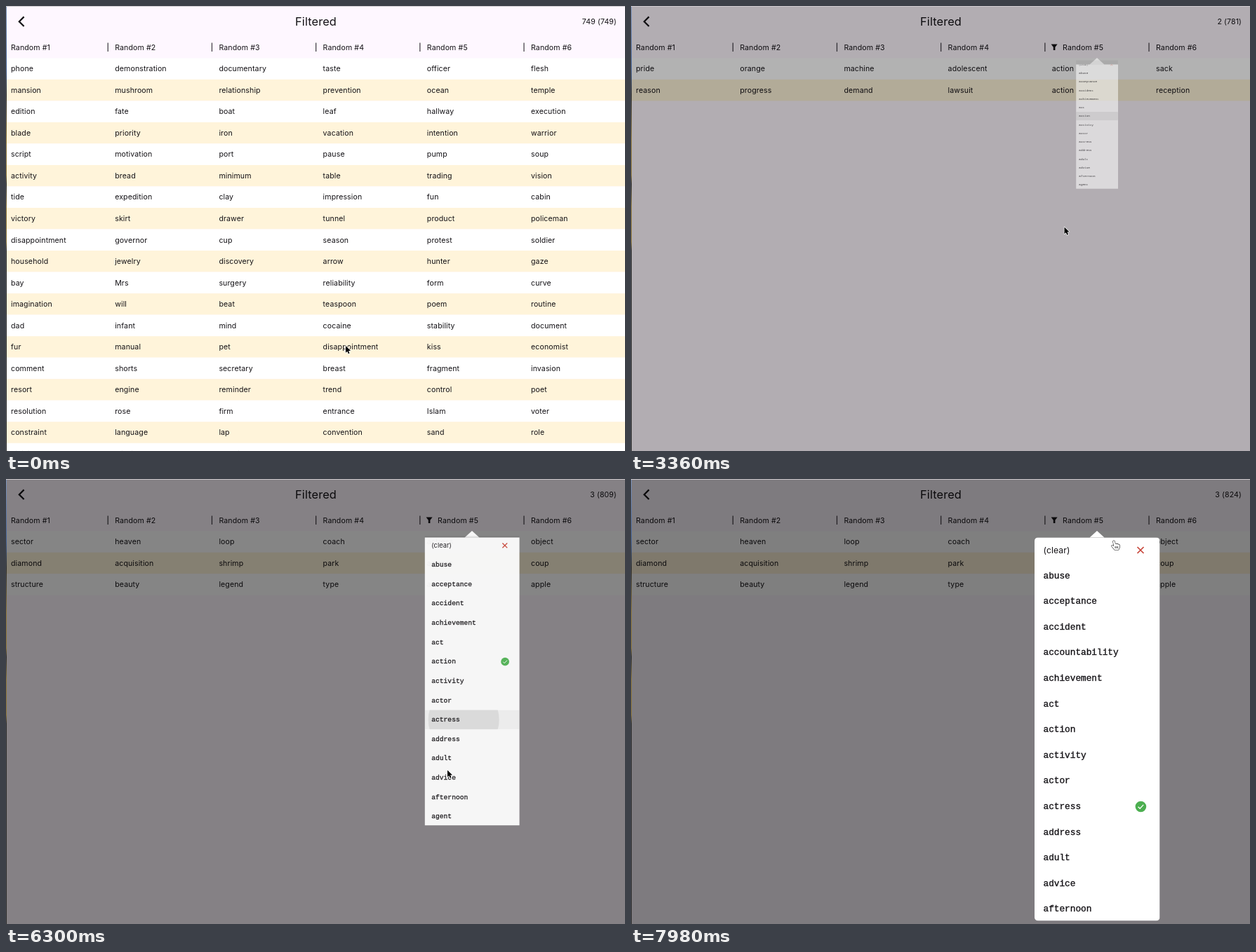
An HTML page with a canvas for the animation above (8000 ms loop, 882x635 px).

```html
<!DOCTYPE html>
<html lang="en">
<head>
<meta charset="utf-8">
<title>Filtered</title>
<style>
  html, body { margin: 0; width: 100%; height: 100%; overflow: hidden; background: #fef7ff; }
  canvas { display: block; width: 882px; height: 635px; }
</style>
</head>
<body>
<canvas id="stage"></canvas>
<script>
const W = 882, H = 635, LOOP = 8000, FADE = 200;
const SANS = 'Inter, sans-serif', MONO = '"Liberation Mono", monospace';
const INK = '#141216';
const canvas = document.getElementById('stage');
const ctx = canvas.getContext('2d');
const ratio = window.devicePixelRatio || 1;
canvas.width = W * ratio;
canvas.height = H * ratio;

const table = text => text.trim().split('\n').map(line => line.trim().split(' '));
const tables = {
  all: table(`
    phone demonstration documentary taste officer flesh
    mansion mushroom relationship prevention ocean temple
    edition fate boat leaf hallway execution
    blade priority iron vacation intention warrior
    script motivation port pause pump soup
    activity bread minimum table trading vision
    tide expedition clay impression fun cabin
    victory skirt drawer tunnel product policeman
    disappointment governor cup season protest soldier
    household jewelry discovery arrow hunter gaze
    bay Mrs surgery reliability form curve
    imagination will beat teaspoon poem routine
    dad infant mind cocaine stability document
    fur manual pet disappointment kiss economist
    comment shorts secretary breast fragment invasion
    resort engine reminder trend control poet
    resolution rose firm entrance Islam voter
    constraint language lap convention sand role
    division wildlife protein sauce theme college`),
  action: table(`
    pride orange machine adolescent action sack
    reason progress demand lawsuit action reception`),
  actress: table(`
    sector heaven loop coach actress object
    diamond acquisition shrimp park actress coup
    structure beauty legend type actress apple`)
};

const words = ('abuse acceptance accident achievement act action activity actor ' +
  'actress address adult advice afternoon agent').split(' ');
const longerWords = [...words.slice(0, 3), 'accountability', ...words.slice(3, -1)];

// press: header tapped, open/close: popup transitions, pick: item tapped
const popups = [
  { press: 1190, open: 1330, pick: 3110, close: 3228, items: words, choice: 'action' },
  { press: 4540, open: 4690, pick: 6130, close: 6252, items: words, checked: 'action', choice: 'actress' },
  { press: 7330, open: 7470, pick: 1e9, close: 1e9, items: longerWords, checked: 'actress' }
];

const pointerPath = [
  [0, 484, 485], [139, 484, 485], [140, 636, 72], [700, 627, 62], [1050, 627, 62],
  [1680, 626, 64], [2200, 626, 64], [2870, 613, 303], [3080, 616, 314], [3300, 617.5, 315.5],
  [4060, 617.5, 315.5], [4480, 640, 61], [5000, 640, 61], [5600, 632, 412], [5810, 629, 415.5],
  [6310, 629, 415.5], [6720, 650, 32], [6880, 650, 32], [7140, 653, 52], [7700, 653, 52],
  [7980, 688, 88], [LOOP, 688, 88]
];

const COLUMN = 148.2, ROW = 30.53, TABLE_TOP = 74.3;
const header = { x: 594, y: 44, w: 140, h: 29.5 };
const popup = { x: 575, y: 83.4, w: 178.5, h: 547, row: 36.6, first: 101.3 };
const tip = { x: 664, y: 74.5 };

const arrowShape = new Path2D('M0 0V9.8L2.3 7.8L3.8 11.3L5.5 10.5L4.1 7.1L7.1 6.9Z');
const handShape = new Path2D('M-1.2 1Q0-1 1.2 1L2 4.5Q5 4 8 6L8.4 9L6.6 13H1L-3 8Q-3.4 6.3-1.8 6.6L0 8Z');

// Sliver of the desktop showing along the left border
const desktop = ctx.createLinearGradient(0, 0, 0, H);
[[0, '#7d93b8'], [0.14, '#3f5f94'], [0.2, '#2b2b2b'], [0.3, '#8a7336'], [0.38, '#8a7336'],
  [0.4, '#2b2b2b'], [0.45, '#8a7336'], [0.53, '#8a7336'], [0.55, '#2b2b2b']]
  .forEach(([stop, color]) => desktop.addColorStop(stop, color));

const clamp = v => Math.max(0, Math.min(1, v));
const easeOut = (p, power) => 1 - (1 - p) ** power;
const shade = alpha => `rgba(0,0,0,${alpha})`;
const inside = (p, r) => p.x >= r.x && p.x <= r.x + r.w && p.y >= r.y && p.y <= r.y + r.h;

function rect(x, y, w, h, color) {
  ctx.fillStyle = color;
  ctx.fillRect(x, y, w, h);
}

function circle(x, y, r, color) {
  ctx.fillStyle = color;
  ctx.beginPath();
  ctx.arc(x, y, r, 0, 2 * Math.PI);
  ctx.fill();
}

function line(points, width, color) {
  ctx.lineWidth = width;
  ctx.strokeStyle = color;
  ctx.beginPath();
  points.forEach(([x, y]) => ctx.lineTo(x, y));
  ctx.stroke();
}

function polygon(points, color) {
  ctx.fillStyle = color;
  ctx.beginPath();
  points.forEach(([x, y]) => ctx.lineTo(x, y));
  ctx.fill();
}

function label(text, x, y, size = 10.6, family = SANS, align = 'left') {
  ctx.font = `${size}px ${family}`;
  ctx.letterSpacing = family === SANS ? '0.1px' : '0px';
  ctx.textAlign = align;
  ctx.fillStyle = INK;
  ctx.fillText(text, x, y);
}

// Monospaced text, slightly heavier than regular
function monoLabel(text, x, y) {
  label(text, x, y, 12.75, MONO);
  ctx.lineWidth = 0.35;
  ctx.strokeStyle = INK;
  ctx.strokeText(text, x, y);
}

function clipped(r, draw) {
  ctx.save();
  ctx.beginPath();
  ctx.rect(r.x, r.y, r.w, r.h);
  ctx.clip();
  draw();
  ctx.restore();
}

function pointerAt(t) {
  const i = pointerPath.findIndex(key => key[0] > t);
  const [t0, x0, y0] = pointerPath[i - 1], [t1, x1, y1] = pointerPath[i];
  const u = (t - t0) / (t1 - t0), k = u * u * (3 - 2 * u);
  return { x: x0 + (x1 - x0) * k, y: y0 + (y1 - y0) * k };
}

const openness = (p, t) => Math.min(clamp((t - p.open) / FADE), clamp(1 - (t - p.close) / FADE));

function drawHeader(t, filter, hovered, current, p) {
  line([[25.6, 15.4], [18.8, 22.2], [25.6, 29]], 2.2, INK);
  label('Filtered', 441.5, 28, 16.4, SANS, 'center');
  const total = Math.floor(749.55 + t * 0.00945);
  const shown = filter === 'all' ? total : tables[filter].length;
  label(`${shown} (${total})`, 870, 25.8, 10.6, SANS, 'right');

  if (hovered) rect(header.x, header.y, header.w, header.h, shade(0.045));
  if (current && t < current.open + FADE) {
    const age = t - current.press, spot = pointerAt(current.press);
    clipped(header, () => {
      ctx.globalAlpha = 1 - p;
      rect(header.x, header.y, header.w, header.h, shade(0.045));
      circle(spot.x, 58, age * 0.25, shade(0.03));
    });
  }
  for (let i = 0; i < 6; i++) {
    const filtered = i === 4 && filter !== 'all';
    const x = 7 + COLUMN * i;
    if (i) rect(x - 10.6, 52.5, 1.3, 12.5, '#4a454d');
    label(`Random #${i + 1}`, x + (filtered ? 15.3 : 0), 62.5);
  }
  if (filter !== 'all') {
    polygon([[598.6, 54.6], [607.6, 54.6], [604.4, 58.8], [604.4, 63], [601.8, 63], [601.8, 58.8]], INK);
  }
}

function drawTable(rows) {
  rows.forEach((row, i) => {
    const y = TABLE_TOP + ROW * i;
    rect(0, y, W, ROW, i % 2 ? '#fff4da' : '#ffffff');
    row.forEach((word, c) => label(word, 7 + COLUMN * c, y + 19));
  });
}

function drawItems(current, t) {
  label('(clear)', 587.5, popup.first + 4.2, 12.2);
  line([[721.5, 97], [730.5, 106]], 1.7, '#c8463a');
  line([[721.5, 106], [730.5, 97]], 1.7, '#c8463a');
  current.items.forEach((word, i) => {
    const y = popup.first + popup.row * (i + 1);
    const box = { x: popup.x, y: y - popup.row / 2, w: popup.w, h: popup.row };
    if (word === current.choice && t >= current.pick) {
      const k = clamp((t - current.pick) / 230), x = pointerAt(current.pick).x;
      clipped(box, () => {
        rect(box.x, box.y, box.w, box.h, shade(0.045));
        circle(x + (tip.x - x) * k * k, y, 90 * k, shade(0.08));
      });
    }
    monoLabel(word, 587.5, y + 3.7);
    if (word === current.checked) {
      circle(726.4, y + 0.2, 7.8, '#4caf50');
      line([[722.6, y + 0.4], [725.2, y + 3], [730.2, y - 2.4]], 1.3, '#fff');
    }
  });
}

function drawPopup(current, p, t) {
  rect(0, 0, W, H, shade(0.5 * easeOut(p, 2.26)));
  ctx.save();
  ctx.globalAlpha = easeOut(p, 1.9);
  polygon([[tip.x, 74], [tip.x + 10.5, popup.y], [tip.x - 10.5, popup.y]], '#fff');
  const top = tip.y + (popup.y - tip.y) * p;
  if (p < 1) rect(tip.x - popup.w / 2 * p, top, popup.w * p, popup.y - top, shade(0.08));

  ctx.beginPath();
  ctx.roundRect(popup.x, popup.y, popup.w, popup.h, 5);
  ctx.clip();
  ctx.translate(tip.x, tip.y);
  ctx.scale(p, p);
  ctx.translate(-tip.x, -tip.y);
  rect(popup.x, popup.y, popup.w, popup.h, '#fff');
  drawItems(current, t);
  ctx.restore();
}

function drawPointer({ x, y }, isHand) {
  const shape = isHand ? handShape : arrowShape;
  ctx.save();
  ctx.translate(x, y);
  ctx.lineJoin = 'round';
  ctx.lineWidth = isHand ? 1.1 : 1.4;
  ctx.strokeStyle = isHand ? '#111' : '#fff';
  ctx.fillStyle = isHand ? '#fff' : '#000';
  ctx.stroke(shape);
  ctx.fill(shape);
  if (isHand) {
    for (const dx of [2, 3.8, 5.6]) line([[dx, 8], [dx, 11]], 0.7, '#111');
  }
  ctx.restore();
}

function render(t) {
  const filter = t < popups[0].close ? 'all' : t < popups[1].close ? 'action' : 'actress';
  const current = popups.find(p => t >= p.press && t < p.close + FADE);
  const p = current ? openness(current, t) : 0;
  const pointer = pointerAt(t);
  const hovered = p === 0 && inside(pointer, header);

  ctx.setTransform(ratio, 0, 0, ratio, 0, 0);
  rect(0, 0, W, H, '#fef7ff');
  drawHeader(t, filter, hovered, current, p);
  drawTable(tables[filter]);
  if (p > 0) drawPopup(current, p, t);
  rect(0, 0, W, 1, '#cbc7cb');
  rect(0, 1, 1, H, desktop);
  drawPointer(pointer, hovered || (p === 1 && inside(pointer, popup)));
}

function tick(now) {
  render(now % LOOP);
  requestAnimationFrame(tick);
}
requestAnimationFrame(tick);
</script>
</body>
</html>
```
